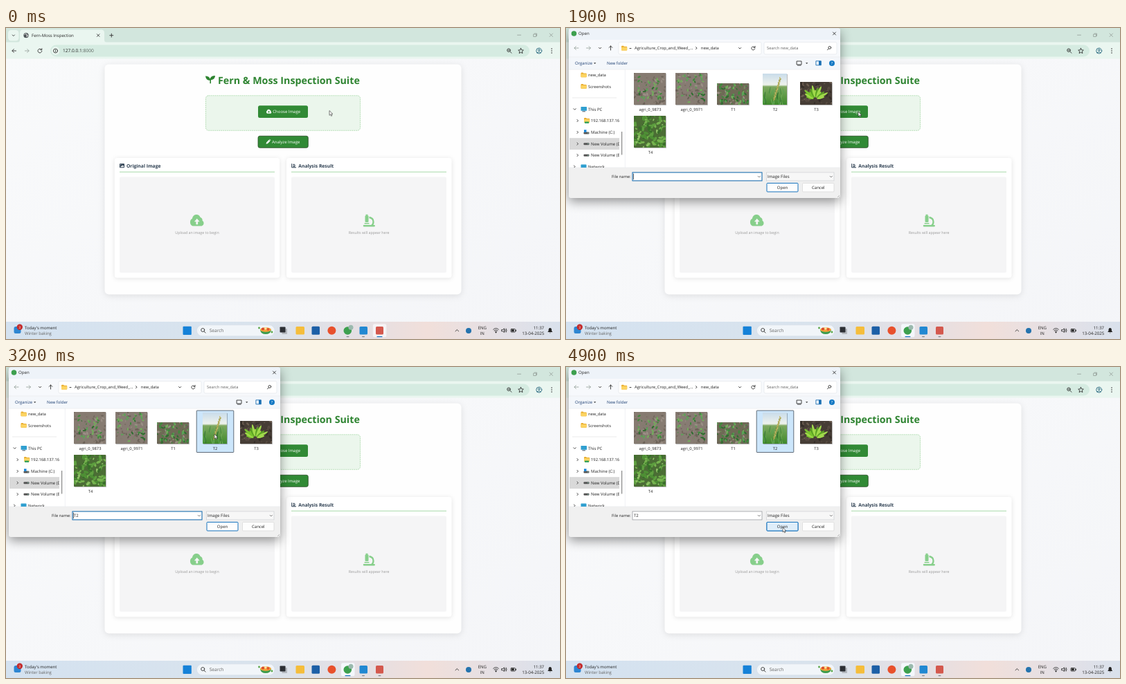
These frames come from a looping animation (800 by 450 pixels, 5000 ms). An HTML page:

```html
<!DOCTYPE html>
<html lang="en">
<head>
<meta charset="utf-8">
<title>Fern-Moss Inspection</title>
<style>
html, body { margin: 0; width: 100%; height: 100%; overflow: hidden; background: #f7f8fa; }
#stage { display: block; width: 100vw; height: 100vh; }
text { font: 6px "Open Sans", "Noto Sans", sans-serif; fill: #222; text-rendering: geometricPrecision; }
.mid { text-anchor: middle; }
.end { text-anchor: end; }
.title { font-size: 14.25px; font-weight: 700; fill: #2e8431; }
.head { font-size: 6.75px; font-weight: 700; fill: #2c3e50; }
.hint { font-size: 5.3px; fill: #9a9a9a; }
.btn { fill: #fff; }
.dim { fill: #666; }
.file { font-size: 5.8px; }
.line { fill: none; stroke: #333; stroke-width: .9; stroke-linecap: round; stroke-linejoin: round; }
.pale { stroke: #9aa5a0; }
.card { fill: #fff; filter: drop-shadow(0 1px 3px rgba(0,0,0,.11)); }
.sheet { fill: #fefefe; filter: drop-shadow(0 2px 5px rgba(0,0,0,.1)); }
.shade { filter: drop-shadow(0 5px 8px rgba(0,0,0,.42)); }

/* hard switches */
.sw { animation: 5s step-end infinite; }
.before { animation-name: before; }
.after { animation-name: after; }
.blank { animation-name: blank; }
.loaded { animation-name: loaded; }
.over3 { animation-name: over3; }
.over2 { animation-name: over2; }
.picked { animation-name: picked; }
.focus { animation-name: focus; }
.caret { animation-name: caret; }
.overOpen { animation-name: overOpen; }
.arrow { animation-name: arrow; }
.hand { animation-name: hand; }
@keyframes before { 0% { opacity: 1 } 30%, 100% { opacity: 0 } }
@keyframes after { 0% { opacity: 0 } 30%, 100% { opacity: 1 } }
@keyframes blank { 0% { opacity: 1 } 37%, 100% { opacity: 0 } }
@keyframes loaded { 0% { opacity: 0 } 37%, 100% { opacity: 1 } }
@keyframes over3 { 0% { opacity: 0 } 53% { opacity: 1 } 55.8%, 100% { opacity: 0 } }
@keyframes over2 { 0% { opacity: 0 } 56.4% { opacity: 1 } 61.5%, 100% { opacity: 0 } }
@keyframes picked { 0% { opacity: 0 } 61.5%, 100% { opacity: 1 } }
@keyframes focus { 0% { opacity: 1 } 66%, 100% { opacity: 0 } }
@keyframes caret { 0% { opacity: 1 } 48% { opacity: 0 } 58% { opacity: 1 } 66%, 100% { opacity: 0 } }
@keyframes overOpen { 0% { opacity: 0 } 92%, 100% { opacity: 1 } }
@keyframes arrow { 0% { opacity: 1 } 9% { opacity: 0 } 30%, 100% { opacity: 1 } }
@keyframes hand { 0% { opacity: 0 } 9% { opacity: 1 } 30%, 100% { opacity: 0 } }

#dialog { transform-origin: 200px 123px; animation: open 5s linear infinite; }
@keyframes open {
  0%, 32% { opacity: 0; transform: translate(-4px, -1px) scale(.88); }
  34% { opacity: .5; transform: translate(-3px, -1px) scale(.908); }
  36.5%, 100% { opacity: 1; transform: none; }
}
#cursor { animation: move 5s ease-in-out infinite; }
@keyframes move {
  0%, 2% { transform: translate(467px, 119.5px); }
  13%, 16% { transform: translate(431px, 122px); }
  28%, 49% { transform: translate(422px, 121px); }
  60%, 68% { transform: translate(301px, 97px); }
  80%, 83% { transform: translate(300px, 148px); }
  95%, 100% { transform: translate(313px, 232px); }
}
</style>
</head>
<body>
<svg id="stage" viewBox="0 0 800 450" xmlns="http://www.w3.org/2000/svg">
  <defs>
    <linearGradient id="page" x2="1" y2="1"><stop stop-color="#f9fafb"/><stop offset="1" stop-color="#f4f5f8"/></linearGradient>
    <linearGradient id="bar"><stop stop-color="#d4e2f0"/><stop offset=".45" stop-color="#d9e3ed"/><stop offset=".66" stop-color="#e6dfe2"/><stop offset=".76" stop-color="#f1dfda"/><stop offset=".9" stop-color="#e3e0e6"/><stop offset="1" stop-color="#d9e1ec"/></linearGradient>
    <linearGradient id="field" x2="0" y2="1"><stop stop-color="#c9dcea"/><stop offset=".36" stop-color="#eef2ec"/><stop offset=".42" stop-color="#7ea860"/><stop offset="1" stop-color="#3f8a2c"/></linearGradient>
    <g id="cloud"><path d="M5 14a5 5 0 0 1-1-9.500A6.500 6.500 0 0 1 16 3a4 4 0 0 1 3 4.200A3.600 3.600 0 0 1 18 14z"/><path d="M11 4.500l4 4h-2.600v3.500h-2.800v-3.500H7z" class="up"/></g>
    <g id="folder"><path d="M0 1q0-1 1-1h2l1 1h3.500q.7 0 .7.700V6q0 .7-.7.700H.7Q0 6.700 0 6z" fill="#e9ad2e"/><rect y="2" width="8.200" height="4.700" rx=".7" fill="#fcd462"/></g>
    <g id="disk"><rect y="1.500" width="8" height="3" rx="1" fill="#555"/><rect x="5.800" y="2.600" width="1.200" height=".8" fill="#9fd"/></g>
    <path id="down" class="line" d="M0 0l1.600 1.600L3.200 0"/>
    <path id="right" class="line" d="M0 0l1.600 1.600L0 3.200" stroke-width=".7"/>
    <clipPath id="side"><rect x="4" y="60" width="73" height="142"/></clipPath>
  </defs>

  <!-- browser -->
  <rect width="800" height="450" fill="url(#page)"/>
  <rect width="800" height="22" fill="#d2e6dd"/>
  <rect y="20.500" width="800" height="24" fill="#eaf6f0"/>
  <rect x="3" y="3" width="15.500" height="15.500" rx="4.500" fill="#eaf6f0"/>
  <use href="#down" x="9.200" y="10"/>
  <path d="M16 21q4 0 4-4V7q0-4.500 4.500-4.500h113Q142 2.500 142 7v10q0 4 4 4z" fill="#eaf6f0"/>
  <circle cx="29" cy="10.700" r="3.600" fill="#4d5356"/>
  <path d="M26.500 9.500q2-2 3.500-.5t-1 2.500M30 13q0-2 2-2" stroke="#fff" stroke-width=".9" fill="none"/>
  <text x="37" y="13" style="font-size:6.100px">Fern-Moss Inspection</text>
  <path class="line" d="M131.400 8.800l3.600 3.600m0-3.600l-3.600 3.600M149.800 10.700h5m-2.500-2.500v5"/>
  <path class="line pale" d="M738.500 10.200h5M762 9h3.500v3.500H762zM763 8h3.500v3.500M785 8l4.500 4.500m0-4.500L785 12.500" stroke-width=".7"/>
  <path class="line" d="M14.500 33H9m2.300-2.500L8.800 33l2.500 2.500"/>
  <path class="line pale" d="M27.500 33H33m-2.300-2.500l2.500 2.500-2.500 2.500"/>
  <path class="line" d="M51.300 31.400a2.900 2.900 0 1 0 .5 2M51.800 29.700v2h-2"/>
  <rect x="64" y="24.500" width="692" height="17" rx="8.500" fill="#d5ebe1"/>
  <circle cx="71.500" cy="33" r="6" fill="#eaf6f0"/>
  <circle class="line" cx="71.500" cy="33" r="3" stroke-width=".7"/><path class="line" d="M71.500 32.800v1.500M71.500 31.500v.1" stroke-width=".7"/>
  <text x="82" y="35.400" style="font-size:6.600px">127.0.0.1:<tspan fill="#59635e">8000</tspan></text>
  <g class="line"><circle cx="726" cy="32.200" r="2.300"/><path d="M727.800 34l2.300 2.300M725 32.200h2"/></g>
  <path class="line" d="M743.500 29.300l1.100 2.500 2.700.3-2 1.800.6 2.700-2.400-1.400-2.400 1.400.6-2.700-2-1.800 2.700-.3z" stroke-width=".8"/>
  <g class="line" style="stroke:#27687e"><circle cx="769.700" cy="33" r="4"/><circle cx="769.700" cy="31.900" r="1.300"/><path d="M767 35.700q2.700-2.400 5.400 0"/></g>
  <g fill="#333"><circle cx="788" cy="30" r=".8"/><circle cx="788" cy="33" r=".8"/><circle cx="788" cy="36" r=".8"/></g>

  <!-- page -->
  <rect class="sheet" x="142.500" y="52.500" width="515" height="333" rx="6"/>
  <path d="M288 69.500q6.500-.2 7 6.300Q288.500 76 288 69.500zM302 69q0 5.500-6 6.300v5h-1.600v-6Q295.500 69 302 69z" fill="#2e8431"/>
  <text class="title" x="306" y="81.200">Fern &amp; Moss Inspection Suite</text>
  <rect x="288.500" y="97.800" width="223" height="50.500" rx="4" fill="#ebf6ec" stroke="#a6d7a8" stroke-width=".8" stroke-dasharray="2 1"/>
  <rect x="364" y="112.300" width="72" height="17.800" rx="2.500" fill="#318a35"/>
  <g fill="#fff" transform="translate(375.500 117.800) scale(.37 .42)"><use href="#cloud" style="--up:#318a35"/></g>
  <text class="btn" x="385.300" y="123.300">Choose Image</text>
  <rect x="364" y="156.300" width="72.300" height="17" rx="2.500" fill="#318a35" stroke="#2c4f29" stroke-width=".8"/>
  <path d="M375.500 167.700l.6-2.300 3.600-3.600 1.800 1.800-3.600 3.600zM380.200 161.300l.6-.5 1.700 1.700-.5.600z" fill="#fff"/>
  <text class="btn" x="384" y="167">Analyze Image</text>

  <rect class="card" x="156.800" y="188" width="238.500" height="173.500" rx="4"/>
  <rect class="card" x="405" y="188" width="238.500" height="173.500" rx="4"/>
  <path d="M164 208.300h224M412 208.300h224" stroke="#a8d9aa"/>
  <rect x="164" y="215.500" width="224" height="138.500" rx="2" fill="#f5f5f6"/>
  <rect x="412" y="215.500" width="224" height="138.500" rx="2" fill="#f5f5f6"/>
  <rect x="164" y="196.300" width="7" height="6" rx=".8" fill="#2c3e50"/>
  <path d="M165 201.300l1.500-2 .9 1 1.400-2.200 1.700 3.200z" fill="#fff"/><circle cx="165.700" cy="197.800" r=".6" fill="#fff"/>
  <text class="head" x="174" y="201.800">Original Image</text>
  <path d="M412.700 196.300v5.500h6.300M414.500 197.300h2.300M414.500 198.900h3.600M414.500 200.400h2.800" stroke="#2c3e50" fill="none"/>
  <text class="head" x="422.300" y="201.800">Analysis Result</text>
  <g fill="#87cf8b" transform="translate(265 270.500) scale(.98 1.150)"><use href="#cloud"/></g>
  <g fill="#87cf8b"><rect x="518.500" y="271.500" width="5" height="9.500" rx="1"/><rect x="519.500" y="269.800" width="3" height="2"/><rect x="517.500" y="282" width="7" height="1.600" rx=".6"/><rect x="515.800" y="285" width="17" height="2.400" rx=".8"/></g>
  <path d="M524.500 274q6 1 6 6.500 0 3.500-2.500 5.500" stroke="#87cf8b" stroke-width="2.300" fill="none"/>
  <text class="hint mid" x="276" y="298">Upload an image to begin</text>
  <text class="hint mid" x="524.200" y="298">Results will appear here</text>

  <!-- taskbar -->
  <rect y="425" width="800" height="25" fill="url(#bar)"/>
  <rect x="11.500" y="432" width="10" height="10" rx="2.500" fill="#2d86d2"/>
  <circle cx="19.800" cy="432.800" r="4.200" fill="#c42b2b"/><text class="mid" x="19.800" y="434.700" style="font-size:5px;fill:#fff">3</text>
  <text x="27" y="435.600">Today's moment</text>
  <text class="dim" x="27" y="443.900">Winter baking</text>
  <rect x="255.500" y="431.800" width="12.300" height="12.300" rx="1" fill="#1581d8"/>
  <rect x="275.500" y="429.800" width="112.500" height="16" rx="8" fill="#f1f5f9" stroke="#d0d7e0" stroke-width=".4"/>
  <g class="line"><circle cx="284.200" cy="437" r="2.500"/><path d="M286.100 439l2 2.100"/></g>
  <text class="dim" x="293.700" y="440.200" style="font-size:6.600px">Search</text>
  <path d="M367 437h16q-1 6-8 6t-8-6z" fill="#3f9c4d"/><ellipse cx="375" cy="436.500" rx="8" ry="3.300" fill="#f3a53a"/><circle cx="371" cy="435.500" r="2" fill="#d9482f"/><circle cx="378.500" cy="436" r="2" fill="#e8552e"/><circle cx="374.800" cy="434.800" r="1.700" fill="#f8e3a4"/><circle cx="365.500" cy="434" r="1.400" fill="#58a748"/><circle cx="384" cy="440" r="1.400" fill="#58a748"/>
  <rect x="398.500" y="435" width="7.500" height="8" rx=".8" fill="#b4b8be"/><rect x="395.500" y="432.500" width="8" height="8" rx=".8" fill="#2c2f34"/>
  <rect x="418.500" y="432" width="12.500" height="11.500" rx="1.500" fill="#f5bd3b"/>
  <rect x="441.500" y="431.800" width="11.500" height="12" rx="1.500" fill="#1d5fa6"/>
  <circle cx="470.400" cy="437.700" r="6" fill="#e8502c"/>
  <rect class="sw after" x="484" y="428.300" width="19.500" height="19" rx="2.500" fill="#f4f7fb"/>
  <rect class="sw before" x="529.800" y="428.300" width="19.500" height="19" rx="2.500" fill="#f6f3f5"/>
  <circle cx="493.300" cy="438" r="5.800" fill="#3da04f"/><circle cx="498" cy="433.300" r="3.500" fill="#9bb9ae"/>
  <rect x="510.500" y="432" width="11.500" height="11.500" rx="1.500" fill="#2288d2"/>
  <rect x="534" y="432" width="11" height="11.500" rx="1.500" fill="#d4584d"/>
  <g fill="#81868d"><rect class="sw before" x="491.500" y="446" width="4" height="1.200" rx=".6"/><rect x="514" y="446" width="4" height="1.200" rx=".6"/><rect class="sw after" x="537.500" y="446" width="4" height="1.200" rx=".6"/></g>
  <g fill="#1574c4"><rect class="sw after" x="489.500" y="446" width="8" height="1.300" rx=".6"/><rect class="sw before" x="535.500" y="446" width="8" height="1.300" rx=".6"/></g>
  <path class="line" d="M649 438.800l2.300-2.300 2.300 2.300"/>
  <circle cx="668" cy="438" r="4" fill="#2473ae"/>
  <text class="mid" x="687.800" y="435.700">ENG</text><text class="mid" x="687.800" y="443.900">IN</text>
  <path class="line" d="M703.700 436.200q3.800-3.600 7.600 0M705 437.800q2.500-2.300 5 0M706.300 439.300q1.200-1 2.400 0" /><circle cx="707.500" cy="440.600" r=".8"/>
  <path class="line" d="M716 436.500h1.400l2-1.700v5.700l-2-1.700H716zM720.900 436.200q.9 1.400 0 2.900M722.200 435q1.800 2.600 0 5.200" stroke-width=".7"/>
  <rect class="line" x="729" y="435.500" width="6.500" height="4.500" rx="1" stroke-width=".7"/><rect x="729.800" y="436.300" width="4" height="2.900" fill="#222"/><path class="line" d="M736.500 437v1.500"/>
  <text class="end" x="777" y="435.700">11:37</text><text class="end" x="777.200" y="443.900" style="font-size:6.150px">13-04-2025</text>
  <path d="M782.500 440v-.8l1-1v-2q.3-2.300 2.200-2.300t2.200 2.300v2l1 1v.8zM784.700 440.800h2q-1 1.500-2 0z" fill="#222"/>

  <!-- file dialog -->
  <g id="dialog">
    <rect class="shade" x="4" y=".5" width="392" height="245.500" rx="3" fill="#f0f0f0"/>
    <path d="M4 17V3.500q0-3 3-3h386q3 0 3 3V17z" fill="#eef3f9"/>
    <rect x="4" y="17" width="392" height="25" fill="#f7f9fc"/>
    <rect x="4" y="42" width="392" height="18" fill="#f4f7fb"/>
    <rect x="4" y="60" width="392" height="142" fill="#fff"/>
    <path d="M4 42h392M4 60h392M85.300 60v142M4 202h392" stroke="#e6e8eb" stroke-width=".6"/>
    <circle cx="11.500" cy="8" r="3.800" fill="#3da04f"/>
    <text x="18" y="10.200" style="font-size:6.100px">Open</text>
    <path class="line" d="M385.500 6l4 4m0-4l-4 4" stroke-width=".7"/>
    <rect x="96" y="209" width="187" height="12" fill="#fff" stroke="#8d9096" stroke-width=".7"/>
    <rect x="289.500" y="209" width="97.500" height="12" fill="#f7f7f7" stroke="#c6c8cc" stroke-width=".6"/>
    <rect x="290" y="224.500" width="45" height="12.500" rx="1" fill="#fdfdfd" stroke="#1673bd"/>
    <rect x="341.500" y="224.500" width="45.500" height="12.500" rx="1" fill="#fdfdfd" stroke="#d0d0d0" stroke-width=".6"/>
    <g class="sw blank"><rect x="77" y="60" width="8" height="142" fill="#f3f3f3"/><rect x="79.700" y="66" width="1.200" height="52" fill="#777"/></g>

    <g class="sw loaded">
      <g class="line pale"><path d="M18 29h-6m2.400-2.400L12 29l2.400 2.400M29.500 29h6m-2.400-2.400l2.400 2.400-2.400 2.400"/></g>
      <use href="#down" x="47.500" y="28.300"/>
      <path class="line" d="M64.500 32v-6m-2.400 2.400l2.400-2.400 2.400 2.400" stroke-width=".8"/>
      <g fill="#fff" stroke="#e0e3e8" stroke-width=".6"><rect x="76" y="20.500" width="206" height="17.500" rx="2"/><rect x="286" y="20.500" width="105" height="17.500" rx="2"/></g>
      <use href="#folder" x="80" y="25.700"/>
      <path class="line" d="M92 29.500h2" stroke-width=".7"/>
      <text x="99" y="31.300" style="font-size:5.900px">Agriculture_Crop_and_Weed_...</text>
      <use href="#right" x="187.500" y="27.500"/>
      <text x="194.800" y="31.300" style="font-size:5.850px">new_data</text>
      <use href="#down" x="249.500" y="28.500"/>
      <path class="line" d="M272.500 28a2.500 2.500 0 1 0 .3 2M273 26.300v2h-2" stroke-width=".7"/>
      <text class="dim" x="290" y="31.300" style="font-size:5.800px">Search new_data</text>
      <g class="line" stroke-width=".7"><circle cx="380.800" cy="28.400" r="1.900"/><path d="M379.400 29.800l-1.900 2"/></g>
      <g style="--t:#1d3f73"><text x="13" y="53.200" style="fill:var(--t)">Organize</text><text x="59" y="53.200" style="fill:var(--t);font-size:5.900px">New folder</text></g>
      <path d="M40 50.300h3.400L41.700 52zM346 50.300h3.400L347.700 52z" fill="#333"/>
      <rect class="line" x="333.500" y="48" width="6.500" height="5" stroke-width=".8"/><path class="line" d="M334.500 54h4.500" stroke-width=".6"/>
      <rect class="line" x="361.300" y="47.800" width="7" height="6" style="stroke:#1b6fb3"/><rect x="365" y="47.800" width="3.300" height="6" fill="#1b6fb3"/>
      <circle cx="384" cy="51" r="4" fill="#1479c4"/><text class="mid" x="384" y="53" style="font-size:5.500px;fill:#fff">?</text>

      <g clip-path="url(#side)">
        <rect x="5" y="159.200" width="73" height="16.800" fill="#d9d9d9"/>
        <use href="#folder" x="21.500" y="64.500"/><text x="32" y="70.200" class="file">new_data</text>
        <use href="#folder" x="21.500" y="81"/><text x="32" y="86.700" class="file">Screenshots</text>
        <path d="M9 101h64" stroke="#dcdcdc" stroke-width=".6"/>
        <use href="#down" x="11" y="116.700"/>
        <rect x="21.500" y="114" width="8.500" height="5.800" rx=".6" fill="#2f9fd0"/><rect x="23.500" y="120.300" width="4.500" height="1" fill="#456"/>
        <text x="32" y="119.900">This PC</text>
        <use href="#right" x="16" y="132.500"/><use href="#right" x="16" y="149.300"/><use href="#right" x="16" y="166"/><use href="#right" x="16" y="182.500"/><use href="#right" x="11.500" y="199"/>
        <use href="#folder" x="26" y="130"/><rect x="27" y="135.500" width="6" height="2.500" fill="#37a35f"/><text x="36" y="136.300" class="file">192.168.137.16</text>
        <use href="#disk" x="25.500" y="149"/><rect x="26" y="147.300" width="3.500" height="3.500" fill="#1685d9"/><text x="36" y="153">Machine (C:)</text>
        <use href="#disk" x="25.500" y="164.700"/><text x="36" y="169.800">New Volume (D:)</text>
        <use href="#disk" x="25.500" y="181.300"/><text x="36" y="186.400">New Volume (E:)</text>
        <rect x="21.500" y="197.500" width="8" height="6" rx=".8" fill="#2f9fd0"/><text x="32" y="203.200">Network</text>
      </g>
      <rect x="80" y="150" width="1.200" height="33.500" fill="#888"/>

      <rect class="sw over3" x="335" y="62.800" width="54" height="61" fill="#e5f3ff"/>
      <rect class="sw over2" x="275" y="62.800" width="54" height="61" fill="#e5f3ff"/>
      <rect class="sw picked" x="275.200" y="63" width="53.600" height="60.500" rx=".8" fill="#cce6fb" stroke="#3d4a57" stroke-width=".8"/>
      <g id="thumbs"></g>

      <text x="66" y="217" class="file">File name:</text>
      <rect class="sw focus" x="96" y="209" width="187" height="12" fill="none" stroke="#2b83c9"/>
      <rect class="sw caret" x="97.300" y="210.700" width=".6" height="8.500"/>
      <text class="sw picked" x="98" y="217.100">T2</text>
      <use href="#down" x="277.200" y="214.400" opacity=".7"/><use href="#down" x="381.200" y="214.400" opacity=".7"/>
      <text x="291" y="217.100" style="font-size:6.100px">Image Files</text>
      <rect class="sw overOpen" x="290" y="224.500" width="45" height="12.500" rx="1" fill="#dfeefa" stroke="#1673bd"/>
      <text class="mid" x="312.500" y="232.900">Open</text>
      <text class="mid" x="364.300" y="232.900">Cancel</text>
      <path d="M395 242l-3 3M395 244l-1 1" stroke="#999" stroke-width=".6"/>
    </g>
  </g>

  <g id="cursor" fill="#fff" stroke="#222" stroke-width=".6" stroke-linejoin="round">
    <path class="sw arrow" d="M0 0v6.800l1.500-1.300 1.100 2.300 1.200-.5-1.100-2.300h2.100z"/>
    <path class="sw hand" d="M-.7.500q.7-.9 1.400 0v3.200l3 .6q1 .3.900 1.400l-.6 3.500H0l-2.300-3.300q0-1.200 1.600-.3z"/>
  </g>
</svg>
<script>
const NS = "http://www.w3.org/2000/svg";
const make = (parent, tag, attrs) => {
  const el = document.createElementNS(NS, tag);
  for (const k in attrs) el.setAttribute(k, attrs[k]);
  return parent.appendChild(el);
};

// arrow inside each cloud takes the colour behind it
document.querySelectorAll(".up").forEach(p => p.style.fill = "var(--up, #f5f5f6)");

let seed = 7;
const rnd = () => (seed = seed * 16807 % 2147483647) / 2147483647;
const pick = list => list[Math.floor(rnd() * list.length)];
const leaf = (svg, x, y, rx, ry, turn, fill) =>
  make(svg, "ellipse", { rx, ry, fill, transform: `translate(${x} ${y}) rotate(${turn})` });

const thumbs = document.getElementById("thumbs");
function photo(name, x, y, w, h, bg, labelY) {
  make(thumbs, "rect", { x: x + .8, y: y + .8, width: w, height: h, fill: "#0005" });
  const svg = make(thumbs, "svg", { x, y, width: w, height: h });
  make(svg, "rect", { width: w, height: h, fill: bg });
  make(thumbs, "text", { x: name === "T4" ? 122 : x + w / 2 + .5, y: labelY, class: "mid file" }).textContent = name;
  return svg;
}
function scatter(svg, n, w, h, size, colours, spread = 1) {
  for (let i = 0; i < n; i++) {
    const x = w / 2 + (rnd() - .5) * w * spread, y = h / 2 + (rnd() - .5) * h * spread;
    const r = size * (.5 + rnd());
    leaf(svg, x, y, r, r * .5, rnd() * 180, pick(colours));
  }
}

const soil = ["#75695f", "#9a8f85", "#85796f", "#6b6258"];
const green = ["#3f8a3c", "#5aa556", "#2f6e30", "#74ad5d"];

const a = photo("agri_0_9873", 98, 65, 46, 46, "#867b71", 120.100);
scatter(a, 70, 46, 46, 2, soil);
scatter(a, 42, 46, 46, 1.800, green, .75);

const b = photo("agri_0_9971", 158, 65, 46, 46, "#877c73", 120.100);
scatter(b, 70, 46, 46, 2, soil);
scatter(b, 45, 46, 46, 1.700, green, .9);

const c = photo("T1", 218, 80, 46, 31, "#6e6a55", 120.100);
scatter(c, 40, 46, 31, 2, soil);
scatter(c, 75, 46, 31, 1.900, green);

const d = photo("T2", 284, 66, 35, 45, "url(#field)", 120.100);
for (let i = 0; i < 24; i++)
  leaf(d, rnd() * 35, 24 + rnd() * 22, .5, 5, rnd() * 40 - 20, pick(green));
for (let i = 0; i < 18; i++)
  leaf(d, 25 - i * .55 + (i % 2), 7 + i * 1.800, .8, 2.200, i % 2 ? 35 : -10, i % 3 ? "#a9a551" : "#c3b765");

const e = photo("T3", 338, 78, 46, 33, "#463d35", 120.100);
scatter(e, 60, 46, 33, 2, ["#352e29", "#574b41", "#6b5d50"]);
for (let i = 0; i < 13; i++) {
  const turn = -75 + i * 12.500, rad = turn * Math.PI / 180, len = 8 + (i % 3) * 2;
  leaf(e, 22 + Math.sin(rad) * len, 25 - Math.cos(rad) * len, 1.700, len * .7, turn, pick(["#79c32d", "#5ba323", "#a0d94b"]));
}

const f = photo("T4", 98, 127, 46, 46, "#4b6d35", 181.800);
scatter(f, 110, 46, 46, 3, ["#4e8f35", "#76b34f", "#386f2a", "#8fc266", "#5e9e40"]);
</script>
</body>
</html>
```
